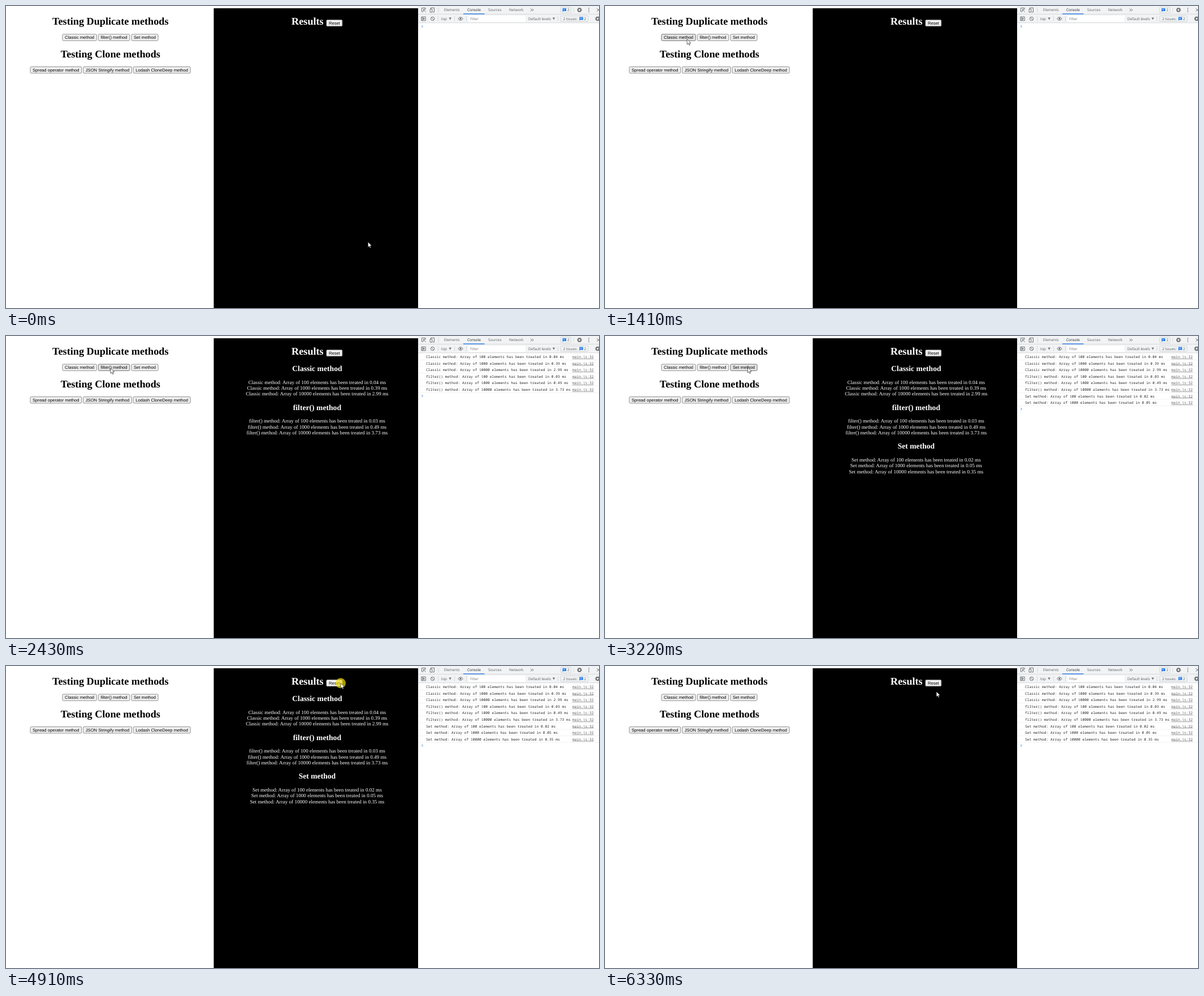
Write an HTML page that moves like this. It is 1049 px wide and 534 px high and loops after 6.53 s.

```html
<!DOCTYPE html>
<html lang="en">
<head>
<meta charset="utf-8">
<title>Array method timings</title>
<style>
html, body { margin: 0; width: 100%; height: 100%; overflow: hidden; background: #fff; }
svg { display: block; width: 1049px; height: 534px; }
text { text-rendering: geometricPrecision; white-space: pre; }
.h1 { font: bold 18.2px "Liberation Serif", serif; }
.h2 { font: bold 13.65px "Liberation Serif", serif; fill: #fff; }
.line { font: 9.12px "Liberation Serif", serif; fill: #fff; }
.btn { font: 7.61px "Liberation Sans", sans-serif; }
.ui { font: 6.4px "Open Sans", sans-serif; fill: #5a5e63; }
.log { font: 6.27px "Noto Sans Mono", monospace; fill: #2b2b2b; }
.link { fill: #5c5c5c; text-decoration: underline; }
.mid { text-anchor: middle; }
.icon { fill: none; stroke: #5f6368; stroke-width: .9; }
</style>
</head>
<body>
<script>
const LOOP = 6530;
const NS = "http://www.w3.org/2000/svg";

function add(parent, tag, attrs = {}, content) {
  const node = document.createElementNS(NS, tag);
  for (const key in attrs) node.setAttribute(key, attrs[key]);
  if (content !== undefined) node.textContent = content;
  parent.appendChild(node);
  return node;
}
const svg = add(document.body, "svg", { viewBox: "0 0 1049 534" });
const rect = (x, y, width, height, fill, more = {}) =>
  add(svg, "rect", { x, y, width, height, fill, ...more });
const label = (cls, x, y, str, parent = svg) => add(parent, "text", { class: cls, x, y }, str);
const icon = (d, more = {}) => add(svg, "path", { class: "icon", d, ...more });
const show = (node, on) => node.setAttribute("visibility", on ? "visible" : "hidden");

// Page
const LEFT = 184.8, RIGHT = 550.4;
rect(367.5, 4, 361.5, 530, "#000");
label("h1 mid", LEFT, 33, "Testing Duplicate methods");
label("h1 mid", LEFT, 90.5, "Testing Clone methods");
label("h1", 505.1, 33, "Results").setAttribute("fill", "#fff");

const buttons = [
  ["Classic method", 99.6, 49.6, 61],
  ["filter() method", 163, 49.6, 56],
  ["Set method", 221.6, 49.6, 47.8],
  ["Spread operator method", 42.7, 107.1, 91.2],
  ["JSON Stringify method", 136.3, 107.1, 86.4],
  ["Lodash CloneDeep method", 224.9, 107.1, 101.6],
  ["Reset", 566.6, 24.1, 28.6]
].map(([name, x, y, w]) => {
  const box = rect(x + .3, y + .3, w - .6, 11.4, "#efefef", { rx: 1.6, "stroke-width": .8 });
  label("btn mid", x + w / 2, y + 8.7, name);
  return { box, x, y, w, h: 12 };
});

// Result blocks and console rows
const runs = [
  ["Classic method", 1690, 1750, [0.04, 0.39, 2.99]],
  ["filter() method", 2360, 2430, [0.03, 0.49, 3.73]],
  ["Set method", 3220, 3290, [0.02, 0.05, 0.35]]
];
const CLEAR = 5110, ROW = 11.6;
const blocks = [], rows = [];
runs.forEach(([name, start, last, times], r) => {
  const top = 61.8 + r * 68.7;
  const node = add(svg, "g");
  label("h2 mid", RIGHT, top, name, node);
  times.forEach((ms, i) => {
    const str = `${name}: Array of ${100 * 10 ** i} elements has been treated in ${ms} ms`;
    label("line mid", RIGHT, top + 22.7 + i * 10.3, str, node);
    const dy = rows.length * ROW;
    const row = add(svg, "g");
    label("log", 743, 38.9 + dy, str, row);
    label("log link", 1002, 38.9 + dy, "main.js:32", row);
    add(row, "path", { d: `M729 ${42.3 + dy}H1049`, stroke: "#ececec", "stroke-width": .7 });
    rows.push({ node: row, start: i < 2 ? start : last });
  });
  blocks.push({ node, start });
});
const prompt = add(svg, "path", {
  d: "M735.2 -1.9L737.4 0L735.2 1.9", fill: "none", stroke: "#367cf1", "stroke-width": .9
});

// Developer tools bars
rect(729, 0, 320, 30, "#f1f3f4");
icon("M729 14.4H1049M729 29.8H1049", { style: "stroke:#cbcdd1;stroke-width:.7" });
icon("M765.2 3V11.5M1004.4 3V11.5M764.5 18V27M793.5 18V27M814.5 18V27M976.5 18V27",
  { style: "stroke:#cbcdd1;stroke-width:.7" });
rect(809, 13.3, 37.5, 1.3, "#1a73e8");
[["Elements", 775], ["Console", 816], ["Sources", 853], ["Network", 890]].forEach(([name, x]) => {
  const tab = label("ui", x, 9.4, name);
  if (name === "Console") tab.style.fill = "#222";
});
icon("M738 10H735.5V3.5H742V6M738.5 6L742.5 10.5M738.5 9.3V6H741.8");
icon("M751.5 5V3.2H757.5V10.8H755M750.2 5.5H753.8V11H750.2Z");
icon("M928 4.8L930.2 7L928 9.2M930.8 4.8L933 7L930.8 9.2", { "stroke-width": .8 });
icon("M1045 4.2L1050.6 9.8M1045 9.8L1050.6 4.2");
[4, 7, 10].forEach(cy => add(svg, "circle", { cx: 1031, cy, r: .85, fill: "#5f6368" }));

function gear(cx, cy) {
  add(svg, "circle", { cx, cy, r: 2.5, class: "icon", style: "stroke-width:1.6" });
  add(svg, "circle", { cx, cy, r: 3.7, class: "icon", style: "stroke-width:1.1;stroke-dasharray:1.5 1.4" });
}
gear(1014.5, 7);
gear(1046.5, 22.5);

const bubble = (x, y) => {
  add(svg, "path", { d: `M${x} ${y}h6.4v5h-5l-1.4 1.4z`, fill: "#1a73e8" });
  icon(`M${x + 1.2} ${y + 1.6}h4M${x + 1.2} ${y + 3.2}h2.8`, { style: "stroke:#fff;stroke-width:.6" });
};
const pill = (x, y, w) => rect(x, y, w, 10, "#f1f3f4", { rx: 1.3, stroke: "#c6c9cd", "stroke-width": .7 });
pill(981.3, 2, 18.2);
bubble(984.6, 4);
label("ui", 993, 9.4, "2");
pill(981.3, 17.4, 48.5);
label("ui", 985.4, 24.9, "2 Issues:");
bubble(1014.4, 19.5);
label("ui", 1022.5, 24.9, "2");

icon("M734.9 19.2H742.2V25.8H734.9ZM736.8 19.2V25.8", { "stroke-width": .8 });
add(svg, "path", { d: "M738 20.6L741 22.5L738 24.4Z", fill: "#5f6368" });
add(svg, "circle", { cx: 754.6, cy: 22.5, r: 3.2, class: "icon" });
icon("M752.3 20.2L756.9 24.8");
icon("M799.6 22.5Q804 16.8 808.4 22.5Q804 28.2 799.6 22.5Z");
add(svg, "circle", { cx: 804, cy: 22.5, r: 1.4, fill: "#5f6368" });
label("ui", 770, 24.9, "top");
label("ui", 924, 24.9, "Default levels");
[783.5, 966.8].forEach(x => add(svg, "path", { d: `M${x} 20.6h4.4l-2.2 3.8z`, fill: "#6e7175" }));
rect(818, 17, 101, 11, "#fff");
label("ui", 821, 25, "Filter").style.fill = "#757575";

// Pointer
const halo = add(svg, "circle", { r: 9, fill: "#f0dc0a", "fill-opacity": .7 });
const pointer = add(svg, "path", {
  d: "M0 0V9.4L2.2 7.4L3.7 10.8L5.2 10.1L3.7 6.8H6.7Z",
  fill: "#fff", stroke: "#000", "stroke-width": .6, "stroke-linejoin": "round"
});

const START = [640.3, 417.3];
// begin, end, steps, destination, optional curve handles
const moves = [
  [180, 800, 10, [155.3, 69]],
  [870, 940, 2, [143.4, 62.2]],
  [1140, 1410, 5, [145.2, 58.6]],
  [1820, 2160, 6, [185, 56.8]],
  [2490, 2770, 5, [252.4, 55.6]],
  [3690, 4310, 10, [601, 36.2], [400, 80], [640, 40]],
  [4380, 4450, 2, [592, 30.3]],
  [5640, 5640, 1, [591.4, 30.3]],
  [5840, 6330, 8, [586.2, 45.2]]
];
const presses = [[1550, 1690], [2230, 2360], [3090, 3220], [4910, 5110]];

const smooth = u => u * u * (3 - 2 * u);
function curve(a, b, c, d, u) {
  const v = 1 - u;
  return v * v * v * a + 3 * v * v * u * b + 3 * v * u * u * c + u * u * u * d;
}
function tipAt(t) {
  let from = START;
  for (const [begin, end, steps, to, c1 = from, c2 = to] of moves) {
    if (t < begin) break;
    if (t < end) {
      const k = 1 + Math.floor((t - begin) / (end - begin) * (steps - 1));
      const u = smooth(k / steps);
      return [0, 1].map(i => curve(from[i], c1[i], c2[i], to[i], u));
    }
    from = to;
  }
  return from;
}

function draw(t) {
  const [x, y] = tipAt(t);
  const pressed = presses.some(([a, b]) => t >= a && t < b);
  pointer.setAttribute("transform", `translate(${x} ${y})`);
  halo.setAttribute("transform", `translate(${x} ${y})`);
  show(halo, pressed);

  for (const b of buttons) {
    const over = x >= b.x && x <= b.x + b.w && y >= b.y && y <= b.y + b.h;
    const [fill, stroke] = !over ? ["#efefef", "#767676"]
      : pressed ? ["#f5f5f5", "#8d8d8d"] : ["#e5e5e5", "#4f4f4f"];
    b.box.setAttribute("fill", fill);
    b.box.setAttribute("stroke", stroke);
  }
  for (const b of blocks) show(b.node, t >= b.start && t < CLEAR);
  let count = 0;
  for (const r of rows) {
    show(r.node, t >= r.start);
    if (t >= r.start) count++;
  }
  prompt.setAttribute("transform", `translate(0 ${36.2 + count * ROW})`);
}

const origin = performance.now();
function tick() {
  draw((performance.now() - origin) % LOOP);
  requestAnimationFrame(tick);
}
tick();
</script>
</body>
</html>
```
